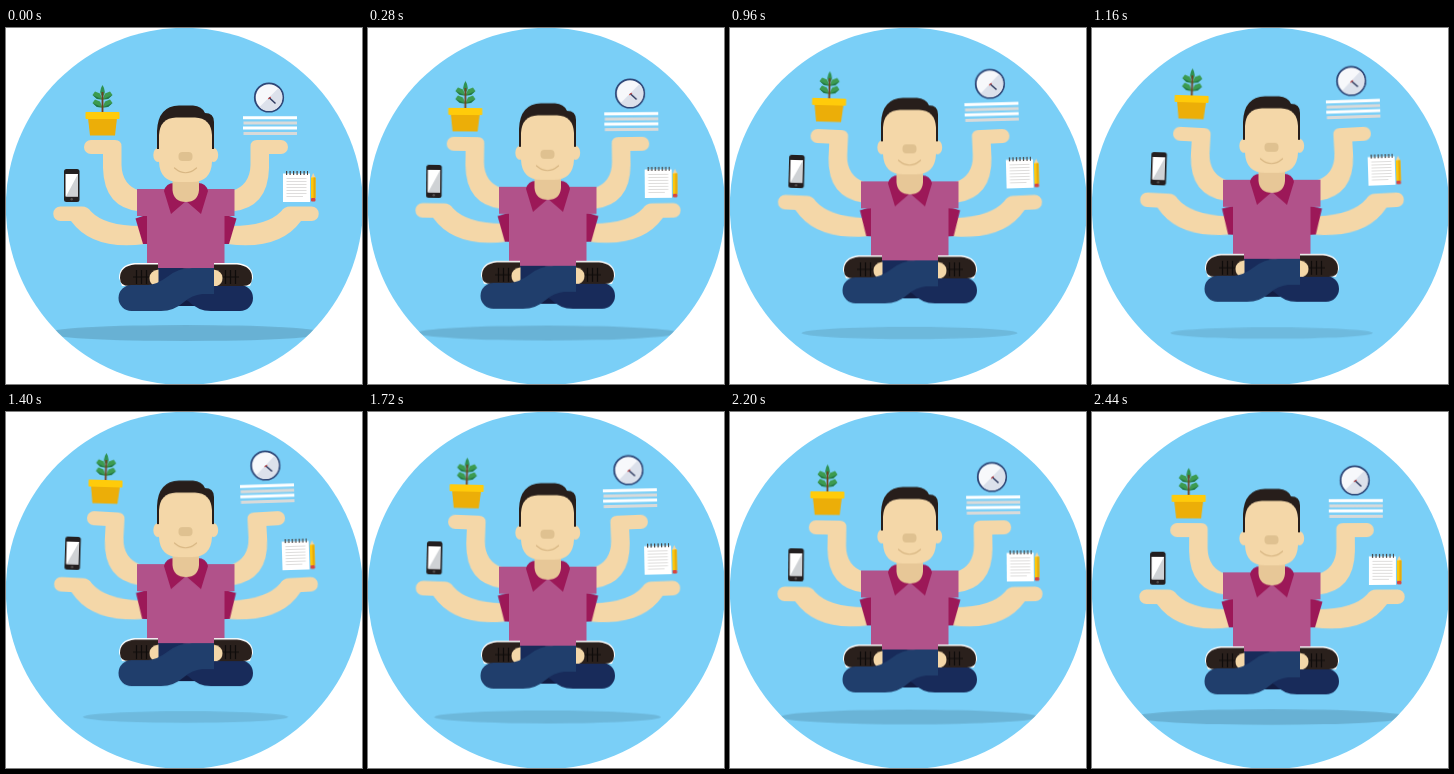
These frames come from a looping animation (356x356 px, 2520 ms). An HTML page:

```html
<!DOCTYPE html>
<html lang="en">
<head>
<meta charset="utf-8">
<title>Floating multitasker</title>
<style>
  html, body { margin: 0; width: 100%; height: 100%; overflow: hidden; background: #fff; }
  svg { display: block; width: 100vw; height: 100vh; }

  .move { animation: move 1260ms linear infinite alternate; }
  .item { transform-box: fill-box; transform-origin: center; }
  .body { --y: -10px; }
  .upper { --y: 0px; --r: 3.5deg; transform-origin: 158px 172px; }
  .lower { --y: 0px; --r: 3.4deg; transform-origin: 142px 200px; }
  .plant { --x: 3.6px; --y: -18px; --r: 2deg; }
  .desk { --x: -3.7px; --y: -18px; --r: -2deg; }
  .phone { --x: 1px; --y: -18.3px; --r: 2deg; }
  .notes { --x: -1px; --y: -18.3px; --r: -2deg; }
  .shadow { transform-origin: 179.5px 305px; animation: shrink 1260ms linear infinite alternate; }

  @keyframes move {
    from { transform: translate(0, 0) rotate(0deg); }
    to { transform: translate(var(--x, 0px), var(--y, 0px)) rotate(var(--r, 0deg)); }
  }
  @keyframes shrink {
    from { transform: scale(1); opacity: 1; }
    to { transform: scale(.7); opacity: .65; }
  }
</style>
</head>
<body>
<svg viewBox="0 0 356 356">
  <defs>
    <clipPath id="disc"><circle cx="178.400" cy="178.400" r="178.600"/></clipPath>

    <path id="upper" fill="#f4d7a8" d="M85 112H109Q115.500 112 115.500 118.500V137Q116 157 134 163V183.500Q98 180 97 140V126H85A7 7 0 0 1 85 112Z"/>
    <g id="lower">
      <path fill="#f4d7a8" d="M54.500 178.500H76Q81.500 178.500 85 183.500Q99 198 134 198L139 216Q87 223 65 193H54.500A7.250 7.250 0 0 1 54.500 178.500Z"/>
      <path fill="#9c1858" d="M129.500 190.500L143 186V216H137Z"/>
    </g>
    <g id="shoe">
      <path fill="#fff" d="M152 235H128Q113 237 113 250L116 258H152Z"/>
      <path fill="#2a201c" d="M152 236.500H129Q114 238 114 250Q114 258 123 258H152Z"/>
      <path fill="none" stroke="#0f0c0b" stroke-width="1.200" d="M130.500 242V256M135.500 242V256M140.500 242V256M127 249H143"/>
      <path fill="#f4d7a8" d="M152.500 241.500Q143.500 243 143.500 250Q143.500 256 149 258H152.500Z"/>
    </g>
    <g id="leaf">
      <path fill="#3c9b50" d="M96.500 72.500L91 72L86.500 68L89 64.500L94 66.500Z"/>
      <path fill="#207546" d="M96.500 72.500L91 72L86.500 68Z"/>
    </g>
    <g id="leaves">
      <use href="#leaf" y="-1"/>
      <use href="#leaf" y="7"/>
    </g>
  </defs>

  <g clip-path="url(#disc)">
    <rect width="356" height="356" fill="#7acff7"/>
    <ellipse class="shadow" cx="179.500" cy="305" rx="140" ry="8" fill="#000" fill-opacity=".145"/>
  </g>

  <g class="move body">
    <g class="move upper"><use href="#upper"/></g>
    <g class="move lower"><use href="#lower"/></g>
    <g transform="matrix(-1 0 0 1 360 0)">
      <g class="move upper"><use href="#upper"/></g>
      <g class="move lower"><use href="#lower"/></g>
    </g>

    <!-- shirt -->
    <path fill="#b1528a" d="M131 161H228.500V188H218.500V242H141V188H131Z"/>
    <path fill="#9c1858" d="M158 163Q160 155 168 155H192Q200 155 202 163L195 186L180 173L165 186Z"/>
    <path fill="#e7c797" d="M166.500 148H193V162Q192 174 180 174Q167.500 174 166.500 162Z"/>

    <!-- head -->
    <ellipse cx="152" cy="127" rx="4.700" ry="7" fill="#f4d7a8"/>
    <ellipse cx="207.500" cy="127" rx="4.700" ry="7" fill="#f4d7a8"/>
    <path fill="#271e1b" d="M151 121V103Q152 78 173 77.500H187Q196 78 199 85Q208 85 208 94V121Z"/>
    <path fill="#f4d7a8" d="M153 107Q154 90 170 89.500H189Q205 90 206 107V134Q205 154 186 154H173Q154 154 153 134Z"/>
    <rect x="172.500" y="124" width="14" height="9" rx="4" fill="#dfc190"/>
    <path fill="none" stroke="#d8b784" stroke-width="1.200" stroke-linecap="round" d="M168.500 140Q179.500 149.500 190.500 140"/>

    <!-- legs -->
    <path fill="#121d43" d="M160 258H200V278H160Z"/>
    <path fill="#182b5a" d="M152 240H176Q190 240 202 250Q212 257 234 257A13 13 0 0 1 234 283H205Q192 283 182 273L152 259Z"/>
    <use href="#shoe"/>
    <use href="#shoe" transform="matrix(-1 0 0 1 360 0)"/>
    <path fill="#203e6c" d="M125.500 257H142Q151 256.500 161 249Q172 240 186 240H208V266H196Q186 267 178 274Q168 283 155 283H125.500A13 13 0 0 1 125.500 257Z"/>
  </g>

  <g class="move item plant">
    <path fill="#2f9152" d="M96.500 57Q101 64 96.500 69Q92 64 96.500 57Z"/>
    <use href="#leaves"/>
    <use href="#leaves" transform="matrix(-1 0 0 1 193 0)"/>
    <path stroke="#70401f" stroke-width="1.800" d="M96.500 64V85"/>
    <path fill="#ecae08" d="M82 90H111L109 107.500H84Z"/>
    <rect x="79.500" y="84" width="34" height="7" rx=".8" fill="#ffcb0a"/>
  </g>

  <g class="move item desk">
    <circle cx="263" cy="69.500" r="14.200" fill="#f7f8fb" stroke="#2d4677" stroke-width="1.800"/>
    <path fill="#dce1eb" d="M272.500 60A13.400 13.400 0 0 1 253.500 79Z"/>
    <path stroke="#2a365c" stroke-width="1.400" d="M263 69.500L269.500 75.500"/>
    <path stroke="#d8453f" stroke-width="1" d="M262 71L265 69"/>
    <path stroke="#fff" stroke-width="3" d="M237 89.800H291M237 100H291"/>
    <path stroke="#d9dad9" stroke-width="3" d="M237.500 95H291M237.500 105.400H291"/>
  </g>

  <g class="move item phone">
    <rect x="58" y="141" width="15.500" height="33" rx="2.500" fill="#231f20"/>
    <rect x="59.500" y="146" width="12.500" height="22.500" fill="#fff"/>
    <path fill="#cfd2d5" d="M72 146V168.500H60Z"/>
    <circle cx="65.700" cy="171.300" r="1.200" fill="#55504f"/>
  </g>

  <g class="move item notes">
    <rect x="277" y="145.500" width="27" height="28.500" fill="#fff"/>
    <path stroke="#45413f" stroke-width="4" stroke-dasharray="1.200 2.300" d="M280 145H302"/>
    <path stroke="#d6d5d4" stroke-width=".8" d="M280.500 150.500H300.500M280.500 153.500H300.500M280.500 156.500H300.500M280.500 159.500H300.500M280.500 162.500H300.500M280.500 165.500H300.500M280.500 168.500H297"/>
    <path fill="#f1d3a2" d="M305 150L307.200 145L309.500 150Z"/>
    <rect x="305" y="149.500" width="4.500" height="20.500" fill="#fdc70c"/>
    <rect x="307.500" y="149.500" width="2" height="20.500" fill="#e6a80a"/>
    <rect x="305" y="170" width="4.500" height="3.500" rx="1" fill="#d8453f"/>
  </g>
</svg>
</body>
</html>
```
